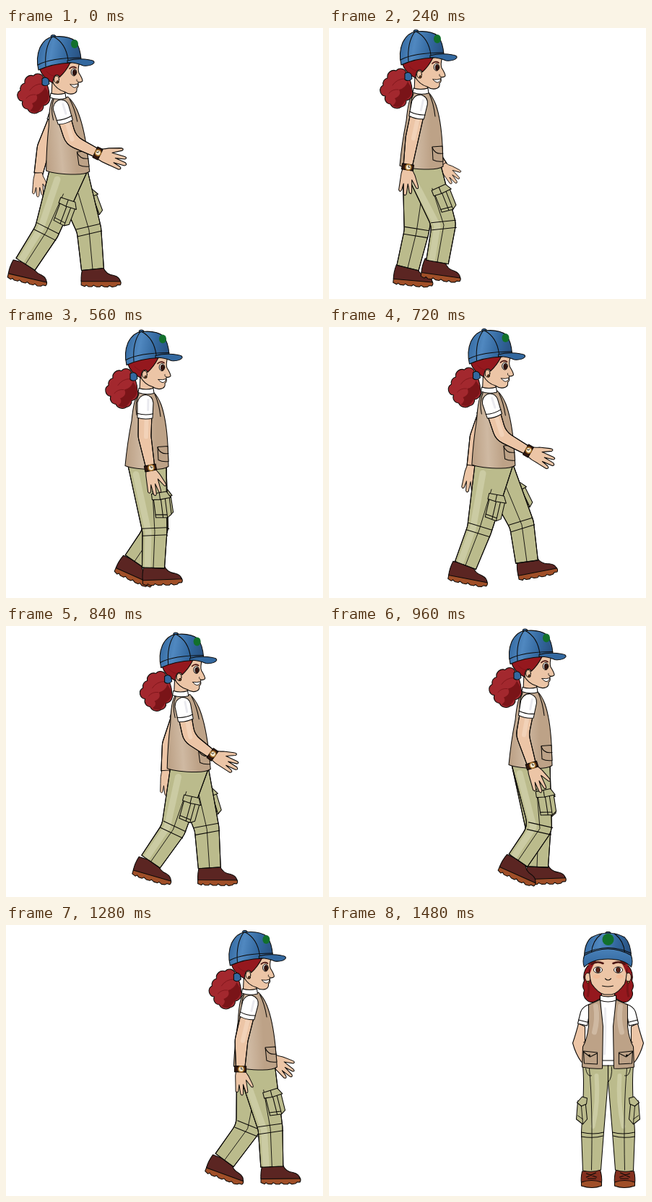
Animation, 439 px wide and 374 px high, one loop 1.56 s. Source, as an HTML page with a canvas:

```html
<!DOCTYPE html>
<html lang="en">
<head>
<meta charset="utf-8">
<title>Walking woman</title>
<style>
html, body { margin: 0; width: 100%; height: 100%; overflow: hidden; background: #fff; }
canvas { display: block; width: 439px; height: 374px; }
</style>
</head>
<body>
<canvas id="stage" width="439" height="374"></canvas>
<script>
const ctx = document.getElementById('stage').getContext('2d');
const LOOP = 1560, STEP = 40, CYCLE = 800, LAST_STRIDE = 1400, TURN = 1480;
const INK = '#0c0a08', SKIN = '#ecc5a6', SKIN_LIGHT = '#f2d2b8', VEST = '#bda287', VEST_LIGHT = '#cfb9a2',
  PANTS = '#bbbb8c', PANTS_LIGHT = '#cbcba3', HAIR = '#95181e', HAIR_LIGHT = '#a3282e', HAIR_DARK = '#7a1418',
  SHOE = '#5b2522', SOLE = '#a04f28', BLUE = '#33689f', BLUE_LIGHT = '#5088c0', BLUE_DARK = '#28507f', GREEN = '#12702c';

// Stride keys: phase, knee x/y, hem x/y, foot angle (relative to the waist)
const LEG = [
  [0, -30, 80, -59, 125, 14], [160, 13, 84, -17, 128, 25],
  [240, 31, 78, 22, 129, 9], [320, 39, 79, 46, 130, -10],
  [400, 29, 78, 34, 132, 1], [560, 11, 87, 9, 137, -1],
  [640, -7, 88, -19, 137, 6], [720, -20, 86, -39, 135, 12]];
// Phase, elbow x/y, wrist x/y, fingertip x/y
const ARM = [
  [0, 4, -46, 41, -28, 82, -13], [160, -11, -45, 2, -3, 16, 35],
  [240, -13, -42, -19, -2, -22, 38], [320, -24, -42, -31, -2, -36, 35],
  [400, -34, -36, -41, 0, -41, 33], [560, -3, -44, 5, -1, 13, 38],
  [640, 0, -45, 30, -4, 50, 20], [720, 10, -44, 48, -23, 85, -4]];
// Phase, waist height, backward lean of the head
const BODY = [[0, 201, 13], [160, 195.5, 0], [240, 194, 0], [320, 194, 5.5]];
// Time, waist x
const TRAVEL = [[0, 86], [240, 128], [560, 195], [720, 228], [960, 279], [1120, 312], [1440, 379]];

// Smooth periodic interpolation through keyed rows
function sample(keys, t, period) {
  const n = keys.length;
  t = (t % period + period) % period;
  let i = n - 1;
  while (keys[i][0] > t) i--;
  const row = k => keys[(k + n) % n];
  const time = k => row(k)[0] + period * Math.floor(k / n);
  const [ta, tb, tc, td] = [i - 1, i, i + 1, i + 2].map(time);
  const h = tc - tb, u = (t - tb) / h;
  return row(i).slice(1).map((b, c) => {
    const a = row(i - 1)[c + 1], e = row(i + 1)[c + 1], f = row(i + 2)[c + 1];
    const m = (e - a) / (tc - ta) * h, q = (f - b) / (td - tb) * h;
    return b + u * (m + u * (3 * (e - b) - 2 * m - q + u * (2 * (b - e) + m + q)));
  });
}

function travel(t) {
  let i = 0;
  while (i < TRAVEL.length - 2 && TRAVEL[i + 1][0] <= t) i++;
  const [t0, x0] = TRAVEL[i], [t1, x1] = TRAVEL[i + 1];
  return x0 + (x1 - x0) * (t - t0) / (t1 - t0);
}

function shape(d, fill, stroke = INK, width = 1.05) {
  const p = d instanceof Path2D ? d : new Path2D(d);
  if (fill) { ctx.fillStyle = fill; ctx.fill(p); }
  if (stroke) { ctx.strokeStyle = stroke; ctx.lineWidth = width; ctx.stroke(p); }
}
const line = (d, width, color) => shape(d, null, color, width);

function oval(x, y, rx, ry, fill, stroke = INK, width = 1) {
  const p = new Path2D();
  p.ellipse(x, y, rx, ry, 0, 0, 7);
  shape(p, fill, stroke, width);
}

function group(draw) {
  ctx.save();
  draw();
  ctx.restore();
}

function ramp(x0, y0, x1, y1, ...colors) {
  const g = ctx.createLinearGradient(x0, y0, x1, y1);
  colors.forEach((c, i) => g.addColorStop(i / (colors.length - 1), c));
  return g;
}

// Unit vector pointing to the front side of segment a-b
function normal(a, b) {
  const x = b[0] - a[0], y = b[1] - a[1], l = Math.hypot(x, y) || 1;
  return [y / l, -x / l];
}
function middle(m, n) {
  const x = m[0] + n[0], y = m[1] + n[1], l = Math.hypot(x, y) || 1;
  return [x / l, y / l];
}
const push = (p, n, d) => [p[0] + n[0] * d, p[1] + n[1] * d];

// Two-segment limb with a rounded joint
function limbPath(backTop, frontTop, mid, end, nMid, nEnd, wMid, wEnd) {
  const p = new Path2D();
  const bm = push(mid, nMid, -wMid), be = push(end, nEnd, -wEnd);
  const fm = push(mid, nMid, wMid), fe = push(end, nEnd, wEnd);
  p.moveTo(...backTop);
  p.arcTo(...bm, ...be, 25);
  p.lineTo(...be);
  p.lineTo(...fe);
  p.arcTo(...fm, ...frontTop, 25);
  p.lineTo(...frontTop);
  return p;
}

function shoe(hem, angle) {
  group(() => {
    ctx.translate(hem[0] - Math.max(0, Math.min(5, angle / 2)), hem[1]);
    ctx.rotate(angle * Math.PI / 180);
    shape('M-15 15 L-15 22 L-10 24 L-8 22 L-5 24 L0 24 L2 22 L6 24 L11 24 L13 22 L17 24 L22 24 L24 22 L28 24 L33 23 L35 21 L39 21 Q41 18 39 15 Z', SOLE);
    shape('M-13 -3 Q-16 8 -15 17 L39 16 Q38 10 30 8 Q19 7 15 -3 Z', SHOE);
  });
}

function cargoPocket(knee, shift) {
  group(() => {
    ctx.rotate(-Math.atan2(knee[0], knee[1]));
    ctx.translate(shift, Math.hypot(...knee) * .6);
    shape('M-10 -12 L-10 16 L6 18 L12 14 L12 -12 Z', PANTS);
    line('M0 -10 V17 M6 -10 V18 M-10 12 L6 14');
    shape('M-12 -17 L9 -18 L14 -9 L-1 -8 L-12 -9 Z', PANTS);
    line('M-1 -17 V-8');
  });
}

function leg(phase, near) {
  const [kx, ky, hx, hy, angle] = sample(LEG, phase, CYCLE);
  const knee = [kx, ky], hem = [hx, hy];
  const nHem = normal(knee, hem), nKnee = middle(normal([0, 0], knee), nHem);
  const p = limbPath([-26, -4], [27, -4], knee, hem, nKnee, nHem, 17, 15.5);
  shoe(hem, angle);
  if (!near) cargoPocket(knee, 15);
  shape(p, PANTS);
  if (near) group(() => {
    ctx.clip(p);
    const a = push(knee, nKnee, -9), b = push(hem, nHem, -8);
    line(`M-15 8 L${a} L${b}`, 9, PANTS_LIGHT);
  });
  shape(p, null);
  const bands = [-5, 5].map(s => {
    const c = [kx + nKnee[1] * -s, ky + nKnee[0] * s];
    return `M${push(c, nKnee, -17)} L${push(c, nKnee, 17)}`;
  });
  line(bands.join(' '));
  line(`M${kx * .35 + 4} ${ky * .35} L${knee} L${hem}`, .9);
  if (near) cargoPocket(knee, 14);
}

function arm(phase, lean, near) {
  const [ex, ey, wx, wy, tx, ty] = sample(ARM, phase, CYCLE);
  const shoulder = [-2 - lean * .65, -93], elbow = [ex, ey], wrist = [wx, wy];
  const nUp = normal(shoulder, elbow), nLow = normal(elbow, wrist), nMid = middle(nUp, nLow);
  const skin = limbPath(push(shoulder, nUp, -9.5), push(shoulder, nUp, 9.5), elbow, wrist, nMid, nLow, 9, 6);
  shape(skin, SKIN);
  if (near) group(() => {
    ctx.clip(skin);
    line(`M${push(shoulder, nUp, 2)} L${push(elbow, nMid, 2)}`, 6, SKIN_LIGHT);
  });
  shape(skin, null);
  group(() => {
    ctx.translate(wx, wy);
    ctx.rotate(-Math.atan2(tx - wx, ty - wy));
    const s = Math.hypot(tx - wx, ty - wy) / 40;
    ctx.scale(Math.max(.85, s), s);
    shape('M-6 -1 Q-9 9 -9 19 L-10 32 Q-8 36 -6 32 L-4 23 L-3 37 Q-1 41 1 37 L2 23 L5 35 Q8 38 8 33 L7 17 L14 28 Q18 30 16 24 L11 11 Q7 5 6 -1 Z', SKIN);
  });
  if (near) group(() => {
    ctx.translate(wx, wy);
    ctx.rotate(Math.atan2(nLow[1], nLow[0]));
    shape('M-8 -4 H8 V4 H-8 Z', '#33180f');
    oval(1, 0, 4, 4, '#f4e9cf', '#a06a24', 1.6);
    line('M1 -2.5 V0 H3', .8);
  });
  group(() => {
    ctx.translate(...shoulder);
    ctx.rotate(-Math.atan2(ex - shoulder[0], ey - shoulder[1]));
    shape('M-10.5 23 L-11 2 Q-9 -8 0 -9 Q10 -8 11 2 L10.5 23 Q0 26 -10.5 23 Z', '#fff');
    line('M-11 17 Q0 20 11 17');
    if (near) line('M4 -2 V12', 3, '#e9e9ee');
  });
}

function sideVest() {
  shape('M184 91 Q177 98 174 130 Q168 160 165 192 Q178 197 205 197 Q219 197 225 193 L224 163 Q222 128 215 108 Q211 97 204 90 Q195 94 184 91 Z',
    ramp(168, 150, 208, 150, VEST, VEST_LIGHT, VEST));
  line('M206 93 Q212 106 214 124 M184 93 Q178 105 181 122');
  shape('M210 166 L224 165 L225 186 Q217 187 211 184 Z', VEST);
  line('M210 167 Q214 177 225 175');
}

function sideHead() {
  // ponytail
  shape('M174 64 A8 8 0 0 0 160 61 A9 9 0 0 0 148 71 A8 8 0 0 0 142 81 A8 8 0 0 0 145 96 A8 8 0 0 0 152 107 A10 10 0 0 0 167 111 A8 8 0 0 0 174 102 A10 10 0 0 0 182 88 Q182 76 174 64 Z', HAIR_LIGHT);
  shape('M176 76 Q173 85 164 87 Q168 95 158 99 Q162 104 155 109 Q162 113 167 110 L174 101 Q184 95 181 84 Z', HAIR_DARK, null);
  line('M172 72 Q161 72 155 81 M163 87 Q155 86 150 92', .8, HAIR_DARK);
  // neck and collar
  shape('M186 68 L185 88 H203 L204 81 Z', SKIN);
  shape('M184 85 Q194 88 204 85 L205 92 Q194 95 183 91 Z', '#fff');
  // face
  shape('M184 60 L206 40 L224 42 Q221 52 223 57 Q228 65 228 68 Q227 70 222 70 L222 73 Q223 76 220 78 Q221 83 217 85 Q210 88 203 83 Q192 80 186 69 Z', SKIN);
  // hair around the ear
  shape('M168 50 Q173 65 187 71 Q187 62 191 60 Q195 59 196 63 Q205 55 211 43 L212 36 L185 36 Z', HAIR);
  line('M178 55 Q185 62 189 61', .8, HAIR_DARK);
  oval(192, 66, 3.4, 5, SKIN);
  oval(193.5, 69.5, 1.5, 1.7, '#8a4a1c');
  shape('M172 65 Q177 61 181 66 L182 72 Q177 77 172 73 Z', BLUE);
  // features
  oval(216, 56, 3.8, 5, '#fff', INK, 1);
  oval(216.6, 56.5, 2.5, 4, '#35130d', INK, .6);
  line('M210 51 Q214 47 219 50', 1.7, '#4a1512');
  line('M222 69 Q219 69 220 66', .8);
  shape('M211 73 Q217 74 222 72 Q220 78 216 77 Q213 76 211 73 Z', '#fff', INK, .9);
  // cap
  oval(187.5, 6.5, 3.5, 2, BLUE);
  shape('M167 53 Q163 36 169 22 Q176 8 188 7 Q208 5 218 13 Q225 22 226 39 L212 43 Q186 44 167 53 Z',
    ramp(165, 20, 227, 32, BLUE, BLUE_LIGHT, BLUE, BLUE_DARK));
  line('M186 7 Q175 22 177 48 M188 7 Q205 16 208 39 M166 46 Q184 36 226 36');
  oval(217, 17, 5, 6, GREEN, null);
  shape('M207 40 Q222 36 238 39 Q245 40 244 43 Q240 48 229 47 Q216 42 207 43 Z', BLUE);
}

function walk(t) {
  const x = travel(t), [y, lean] = sample(BODY, t, CYCLE / 2);
  const far = t + CYCLE / 2;
  group(() => {
    ctx.translate(x, y);
    arm(far, lean, false);
    leg(far, false);
    leg(t, true);
  });
  group(() => {
    ctx.translate(x - 195, y - 196);
    group(() => {
      const k = lean / 150;
      ctx.transform(1, 0, k, 1, -k * 196, 0);
      sideVest();
    });
    ctx.translate(-lean, 0);
    sideHead();
  });
  group(() => {
    ctx.translate(x, y);
    arm(t, lean, true);
  });
}

// Left half of the standing pose, drawn around x = 0
function frontHalf() {
  shape('M-28 56 Q-36 66 -33 77 Q-37 84 -33 90 Q-36 98 -30 103 Q-25 109 -17 105 L-8 100 V60 Z', HAIR);
  line('M-29 72 Q-25 84 -28 98', 3, HAIR_DARK);
  shape('M-41 136 Q-44 148 -49 163 Q-45 178 -37 189 L-32 190 L-32 140 Z', SKIN);
  line('M-34 162 L-29 159', .9);
  shape('M-25 109 Q-36 113 -38 120 L-42 136 L-29 139 L-24 112 Z', '#fff');
  line('M-41 131 L-29 134');
  shape('M-36 340 Q-38 350 -37 356 H-9 Q-8 348 -11 338 Z', '#84301f');
  shape('M-37 355 Q-23 350 -9 355 V360 Q-22 365 -37 360 Z', SOLE);
  line('M-30 343 L-16 348 M-17 342 L-30 348 M-28 350 H-17', 1.2);
  shape('M-35 194 Q-33 215 -35 250 L-37 286 L-35 339 Q-22 342 -10 338 L-6 286 L0 214 V194 Z', PANTS);
  line('M-16 208 Q-13 245 -21 278', 6, PANTS_LIGHT);
  line('M-37 286 Q-20 290 -6 286 M-37 292 Q-20 295 -7 291');
  line('M-26 198 Q-21 250 -23 338 M-31 198 Q-29 210 -23 208', .9);
  shape('M-42 243 L-32 239 L-29 268 L-35 275 L-44 268 Z', PANTS);
  shape('M-43 245 L-36 237 L-29 239 L-30 247 L-37 250 Z', PANTS);
  line('M-37 250 L-35 274 M-42 263 L-35 268', .9);
}

function frontVest() {
  shape('M-11 103 Q-20 107 -27 110 L-27 140 Q-29 158 -35 168 L-36 196 Q-22 199 -8 198 L-7 140 Z', VEST);
  line('M-17 112 Q-14 130 -19 148', 7, VEST_LIGHT);
  shape('M-34 174 L-15 176 L-15 192 L-33 191 Z', VEST);
  line('M-34 175 L-25 182 L-15 177');
  oval(-26, 180, 1, 1, INK);
}

function frontEar() {
  oval(-28, 72, 4, 6, SKIN);
  oval(-28, 79, 1.3, 1.3, '#c58a2e', INK, .8);
}

function frontEye() {
  oval(-14, 62, 6, 4.2, '#fff', INK, .9);
  oval(-14, 62, 3, 3.7, '#5b2317', INK, .7);
  line('M-23 54 Q-15 49 -7 53', 2.6, '#4a1512');
  oval(-16, 71, 5, 3, '#f2bc98', null);
}

function bothSides(draw) {
  draw();
  group(() => {
    ctx.scale(-1, 1);
    draw();
  });
}

function stand() {
  group(() => {
    ctx.translate(386.5, 0);
    bothSides(frontHalf);
    line('M0 194 V214 M5 196 Q6 211 0 217', .9);
    shape('M-11 102 H11 L8 187 H-8 Z', '#fff');
    line('M-4 115 Q-3 145 -5 178', 3, '#ececf0');
    bothSides(frontVest);
    shape('M-9 88 H9 V99 H-9 Z', SKIN);
    shape('M-11 97 Q0 101 11 97 V104 Q0 108 -11 104 Z', '#fff');
    bothSides(frontEar);
    shape('M-26 46 H26 Q27 70 23 81 Q14 94 5 96 H-5 Q-14 94 -23 81 Q-27 70 -26 46 Z', SKIN);
    shape('M-28 51 L-16 49 Q-22 56 -25 67 Z M28 51 L16 49 Q22 56 25 67 Z', HAIR, null);
    bothSides(frontEye);
    line('M-4 74 Q0 78 4 74 M-8 84 Q0 86 7 84', 1.1);
    oval(0, 11.5, 4, 2.2, BLUE);
    shape('M-33 45 Q-33 25 -23 17 Q-12 11 0 11 Q12 11 23 17 Q32 26 32 45 Q0 28 -33 45 Z',
      ramp(-33, 20, 32, 34, BLUE, BLUE_LIGHT, BLUE, BLUE_DARK));
    line('M-9 12 Q-22 22 -23 38 M9 12 Q22 22 23 38 M-32 39 Q0 24 32 39');
    oval(0, 20, 8, 8, GREEN, null);
    shape('M-33 42 Q0 24 32 42 Q35 51 32 58 Q22 47 0 47 Q-22 47 -33 58 Q-36 51 -33 42 Z',
      ramp(0, 32, 0, 56, '#4a82ba', BLUE));
  });
}

ctx.lineJoin = ctx.lineCap = 'round';
let start;
function frame(now) {
  start ??= now;
  const t = Math.floor((now - start) % LOOP / STEP) * STEP;
  ctx.fillStyle = '#fff';
  ctx.fillRect(0, 0, 439, 374);
  if (t < TURN) walk(Math.min(t, LAST_STRIDE));
  else stand();
  requestAnimationFrame(frame);
}
requestAnimationFrame(frame);
</script>
</body>
</html>
```
